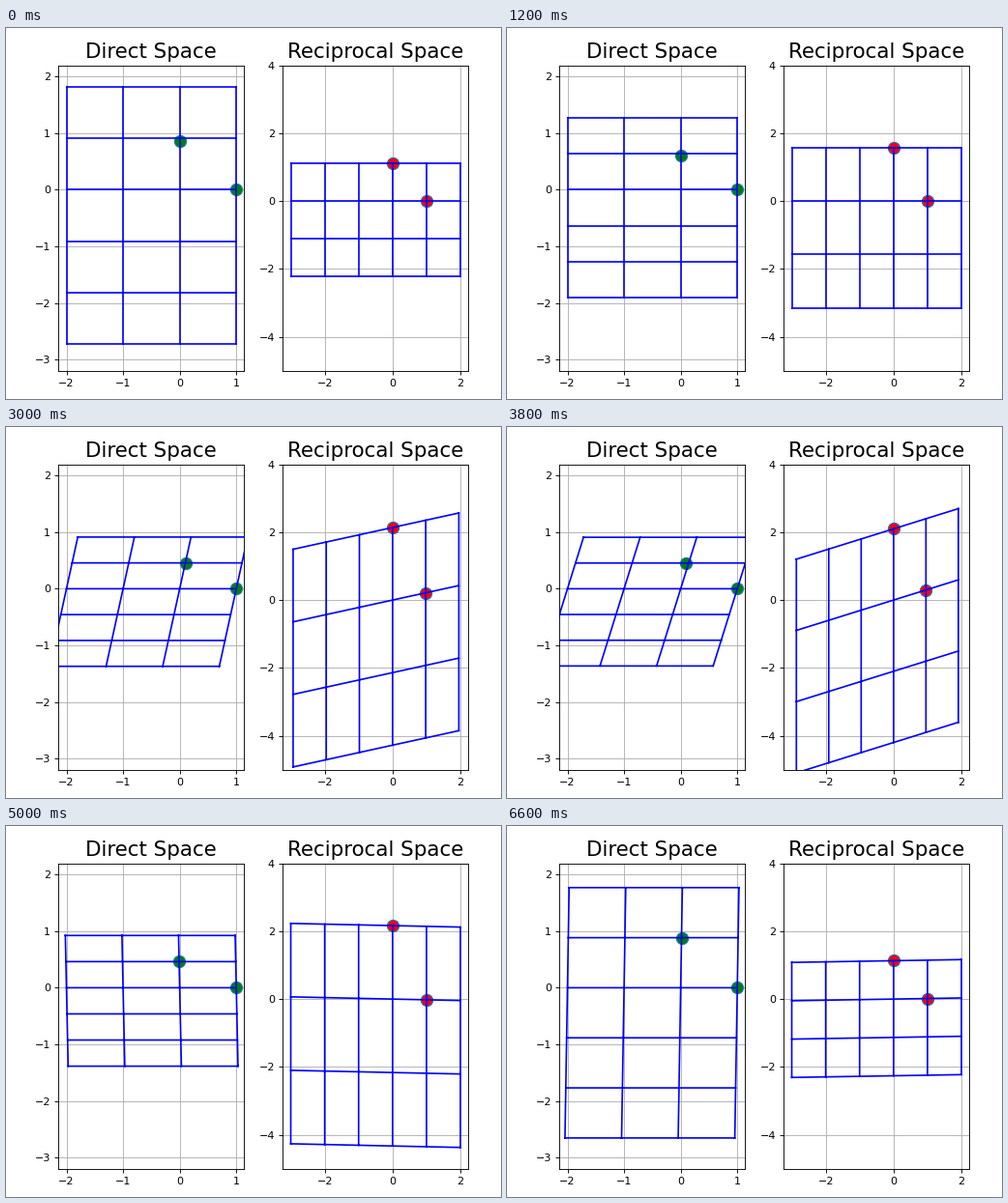
A matplotlib script for the animation above (6.8 s loop, 512x384 px).

```python
import numpy as np
import matplotlib.pyplot as plt
from matplotlib.animation import FuncAnimation

W, H, DPI = 512, 384, 80
FRAMES, STEP = 34, 200
TOP, BOTTOM = 38.6, 354.8

# Drag of the second direct vector: squeeze, shear right, swing back, stretch
KEYS = [(0, 0, 0.908), (6, 0, 0.635), (10, 0.0165, 0.5015),
        (14, 0.1, 0.457), (17, 0.142, 0.455), (19, 0.042, 0.457),
        (22, -0.01, 0.462), (25, -0.03, 0.707), (28, 0.0147, 0.885)]
PAUSES = (9, 18, 24, 26, 27)
TURN = 20


def pose(u):
    t, x, y = zip(*KEYS)
    return np.array([np.interp(u, t, x), np.interp(u, t, y)])


def grid_path(u, v, cols, rows):
    """All lattice lines as one polyline broken by NaN."""
    gap = np.full(2, np.nan)
    pts = []
    for i in range(cols[0], cols[1] + 1):
        pts += [i * u + rows[0] * v, i * u + rows[1] * v, gap]
    for j in range(rows[0], rows[1] + 1):
        pts += [cols[0] * u + j * v, cols[1] * u + j * v, gap]
    return np.array(pts).T


def make_panel(left, right, xlim, ylim, title, color):
    ax = fig.add_axes([left / W, 1 - BOTTOM / H,
                       (right - left) / W, (BOTTOM - TOP) / H])
    ax.set(xlim=xlim, ylim=ylim)
    ax.set_title(title, fontsize=19.2, pad=6.8)
    ax.grid(True, color="#b0b0b0", linewidth=0.8)
    dots, = ax.plot([], [], "o", ms=11, mfc=color, mec="tab:blue",
                    mew=1, zorder=1.9)
    lines, = ax.plot([], [], color="blue", lw=1.5, zorder=2)
    return ax, dots, lines


plt.rcParams["font.family"] = "DejaVu Sans"
plt.rcParams["font.size"] = 10
fig = plt.figure(figsize=(W / DPI, H / DPI), dpi=DPI, facecolor="white")

direct, d_dots, d_lines = make_panel(
    53.75, 246.4, (-2.15, 1.14), (-3.2, 2.2), "Direct Space", "green")
direct.set_xticks(range(-2, 2))
direct.set_yticks(range(-3, 3))

recip, r_dots, r_lines = make_panel(
    285.75, 478.45, (-3.25, 2.24), (-5, 4), "Reciprocal Space", "red")
recip.set_xticks([-2, 0, 2])
recip.set_yticks(range(-4, 5, 2))


def draw(k):
    u = k - sum(p <= k for p in PAUSES)
    lead = 1 if u <= TURN else 0.1  # the dragged dot runs ahead of the lattice
    a1, a2 = np.array([1.0, 0.0]), pose(u)
    size = np.hypot(*a2)
    b1, b2 = a2[::-1] / size, np.array([0.0, 1 / size])

    d_lines.set_data(*grid_path(a1, a2, (-2, 1), (-3, 2)))
    d_dots.set_data(*np.array([a1, pose(u + lead)]).T)
    r_lines.set_data(*grid_path(b1, b2, (-3, 2), (-2, 1)))
    r_dots.set_data(*np.array([b1, b2]).T)
    return d_lines, d_dots, r_lines, r_dots


anim = FuncAnimation(fig, draw, frames=FRAMES, interval=STEP,
                     init_func=lambda: draw(0), repeat=True, repeat_delay=0)
plt.show()
```
